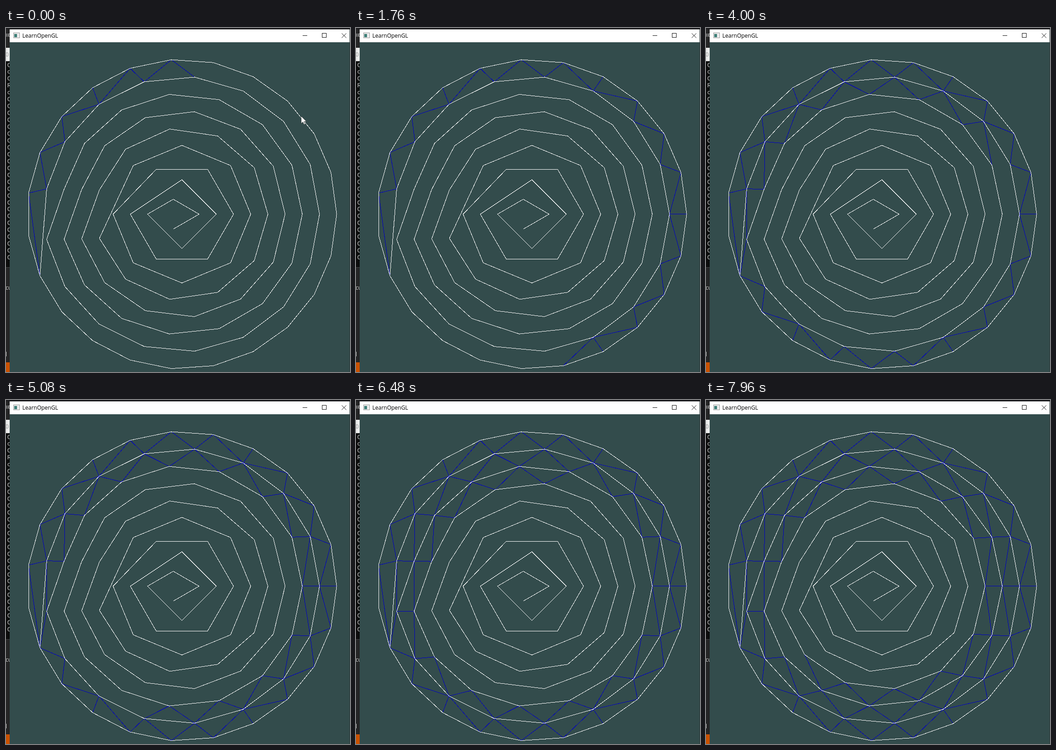
These frames come from a looping animation (748 by 748 pixels, 8000 ms). An HTML page:

```html
<!DOCTYPE html>
<html lang="en">
<head>
<meta charset="utf-8">
<title>Spiral strip</title>
<style>
  html, body { margin: 0; width: 100%; height: 100%; overflow: hidden; background: #252526; }
  svg { display: block; width: 100vw; height: 100vh; }
  .title { font: 12px "Open Sans", sans-serif; }
  .side { font: 12px "Open Sans", sans-serif; fill: #ddd; }
  .console { font: 13px "Liberation Mono", monospace; fill: #ccc; }
  .line { fill: none; stroke-width: 1; shape-rendering: crispEdges; }
</style>
</head>
<body>
<svg viewBox="0 0 748 748">
  <rect width="748" height="748" fill="#252526"/>
  <rect width="748" height="3" fill="#1d1d20"/>
  <text class="side" x="-3" y="19">xe</text>
  <rect y="43" width="8" height="29" fill="#ececec"/>
  <text class="side" x="-1" y="62" style="fill:#999">0</text>
  <rect y="73" width="8" height="447" fill="#0c0c0c"/>
  <g id="rows" class="console"></g>
  <rect y="520" width="8" height="1" fill="#444"/>
  <text class="side" x="-1" y="569">cu</text>
  <text class="side" x="-1" y="714">l</text>
  <rect y="727" width="8" height="21" fill="#ca5100"/>

  <rect x="8" y="3" width="740" height="745" fill="#334c4c"/>
  <rect x="8" y="3" width="740" height="28" fill="#fff"/>
  <rect x="16.5" y="10.5" width="13" height="11" fill="#eee" stroke="#999"/>
  <rect x="18" y="13" width="6" height="7" fill="#3f7f78"/>
  <text class="title" x="35.5" y="21">LearnOpenGL</text>
  <g class="line" stroke="#111">
    <path d="M645 16.5H655M687.5 11.5h9v9h-9z"/>
    <path d="M730 11.5l10 10m0-10l-10 10" style="shape-rendering:auto"/>
  </g>
  <path id="strip" class="line" stroke="#0000c4"/>
  <path id="spiral" class="line" stroke="#fff"/>
  <path id="cursor" d="M0 0V15.5L3.6 12.2 6 17.8 8.4 16.8 6 11.2H11Z" fill="#fff" stroke="#222" stroke-width=".6"/>
  <rect x="747" y="3" width="1" height="745" fill="#2a3838"/>
</svg>
<script>
const LOOP = 8000, CX = 382.5, CY = 404.8, STEP = 37.4;
const $ = id => document.getElementById(id);

// Clipped console text at the left edge
for (let i = 0; i < 29; i++) {
  const ch = i === 3 ? "R" : i === 1 || i === 4 ? "c" : "C";
  $("rows").innerHTML += `<text x="-5" y="${84.5 + i * 14.95}">:${ch}</text>`;
}

// Spiral from the outside in: each ring is a regular polygon walked backwards
const sides = [23, 17, 15, 13, 11, 8, 6, 4, 3];
const chain = [];
sides.forEach((n, ring) => {
  const r = STEP * (9 - ring);
  const start = ring ? Math.ceil(n / 2) - 1 : 13;
  const count = ring ? n : n + 1;
  for (let j = 0; j < count; j++) {
    const a = (start - j) * 2 * Math.PI / n;
    chain.push((CX + r * Math.cos(a)).toFixed(1) + " " + (CY - r * Math.sin(a)).toFixed(1));
  }
});
$("spiral").setAttribute("d", "M" + chain.join("L"));

// Triangle strip: outer and inner pointers take turns, outer moves twice at some edges
const doubles = [8, 15, 22, 29, 36, 57, 72, 87];
const edges = [];
let outer = 1, inner = 23, moveOuter = false;
for (let k = 1; k <= 96; k++) {
  moveOuter = doubles.includes(k) || !moveOuter;
  if (moveOuter) outer++; else inner++;
  edges.push(`M${chain[outer]}L${chain[inner]}`);
}

// Pace of the strip: [time in ms, edges drawn]
const pace = [[0, 11], [480, 16], [680, 17], [880, 20], [1000, 21], [1520, 27], [2320, 34],
  [2360, 35], [2560, 38], [2680, 39], [2880, 41], [3040, 42], [3440, 49], [3600, 50],
  [4000, 53], [4080, 54], [4120, 55], [4280, 56], [5080, 65], [5160, 66], [6000, 75],
  [6480, 80], [6840, 84], [7680, 93], [7960, 96], [8000, 96]];

function edgeCount(t) {
  const i = pace.findIndex(p => p[0] > t);
  const [t0, n0] = pace[i - 1], [t1, n1] = pace[i];
  return Math.floor(n0 + (n1 - n0) * (t - t0) / (t1 - t0) + 1e-6);
}

let shown = -1;
function draw(now) {
  const t = now % LOOP;
  const n = edgeCount(t);
  if (n !== shown) {
    $("strip").setAttribute("d", edges.slice(0, n).join(""));
    shown = n;
  }
  const p = Math.max(0, (t - 40) / 200);
  $("cursor").setAttribute("transform", `translate(${642 + 106 * p} ${192 + 112 * p})`);
  $("cursor").setAttribute("visibility", p < 1 ? "visible" : "hidden");
  requestAnimationFrame(draw);
}
draw(0);
</script>
</body>
</html>
```
